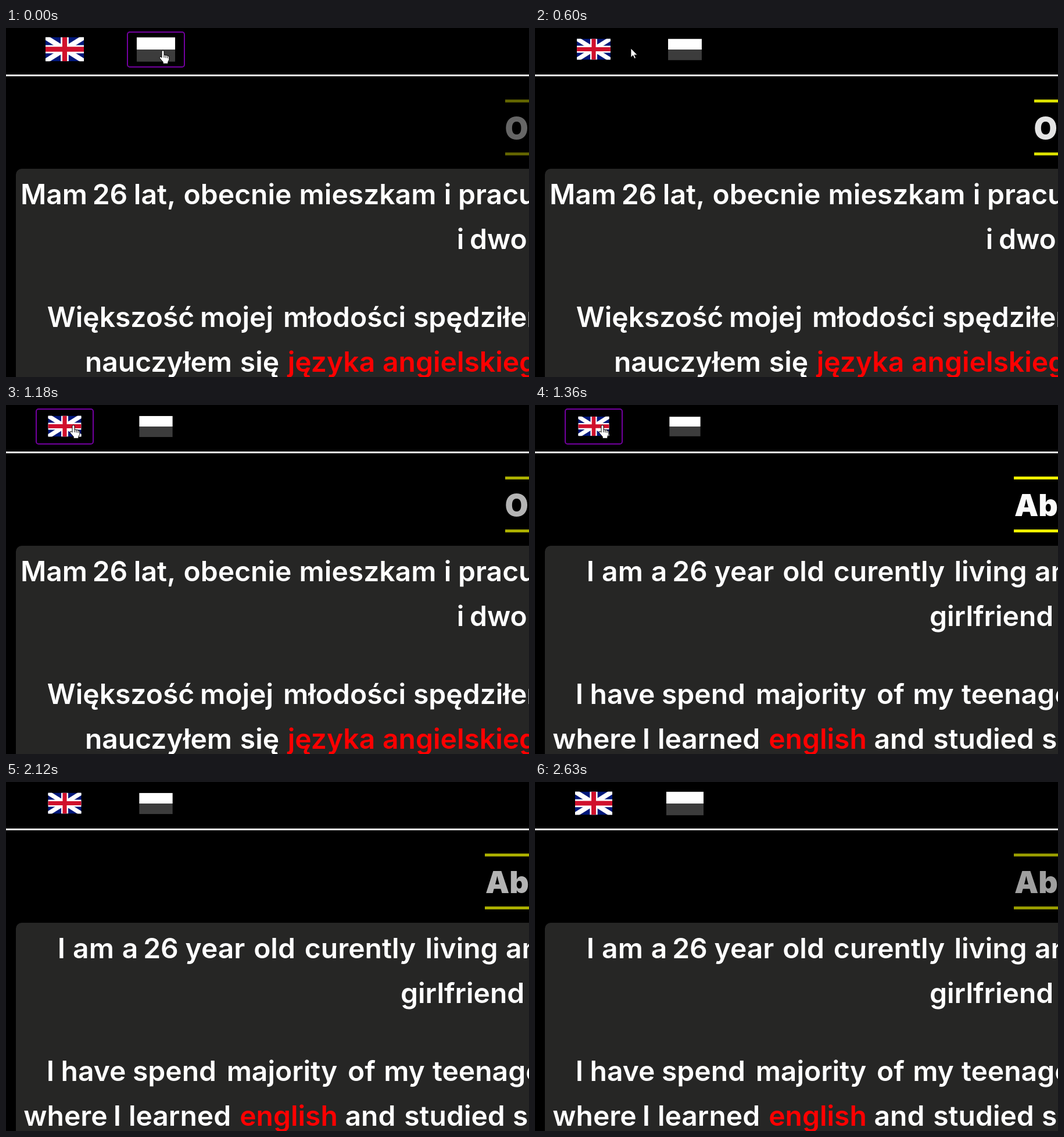
These frames come from a looping animation (900x600 px, 2.65 s). An HTML page:

```html
<!DOCTYPE html>
<html lang="pl">
<head>
<meta charset="utf-8">
<title>Language switch</title>
<style>
  html, body { margin: 0; width: 100%; height: 100%; overflow: hidden; background: #000; }
  svg { display: block; }
  text { font: 600 48px Inter, "Open Sans", sans-serif; fill: #fff; white-space: pre; }
  .title text { font-size: 52px; font-weight: 900; }
  .key { fill: #f00; }
  .hover { fill: none; stroke: #7300a0; stroke-width: 2; }
</style>
</head>
<body>
<svg width="900" height="600" viewBox="0 0 900 600">
  <rect width="900" height="600"/>
  <rect y="80" width="900" height="3" fill="#fff"/>
  <rect x="17" y="242" width="920" height="400" rx="10" fill="#262625"/>

  <rect class="hover" id="boxEn" x="52" y="7" width="98" height="60" rx="4"/>
  <rect class="hover" id="boxPl" x="209" y="7" width="98" height="60" rx="4"/>

  <g id="flagEn">
    <svg x="-33.3" y="-20.8" width="66.6" height="41.6" viewBox="0 0 66 41" preserveAspectRatio="none">
      <rect width="66" height="41" fill="#00187a"/>
      <path d="M0 0L66 41M66 0L0 41" stroke="#fff" stroke-width="8.5"/>
      <path d="M33 0V41M0 20.5H66" stroke="#fff" stroke-width="13.7"/>
      <path d="M33 0V41M0 20.5H66" stroke="#d0102c" stroke-width="8.2"/>
    </svg>
  </g>
  <g id="flagPl">
    <rect x="-33.3" y="-21" width="66.6" height="21" fill="#fff"/>
    <rect x="-33.3" width="66.6" height="21" fill="#3c3c3c"/>
  </g>

  <g id="pl"></g>
  <g id="en"></g>

  <g id="hand" stroke="#000" stroke-linejoin="round">
    <path fill="#fff" d="M-2 1.6Q-2 -.4 0 -.4T2 1.6V7L8 8.2Q10.8 9 10.8 11.6V15.5L8.8 19.5V22.3H.2V19.5L-5.6 12.8Q-6.4 10-3.8 10.4L-2 12Z"/>
    <path fill="none" d="M2 7V12M5 8V12.5M8 8.6V13"/>
  </g>
  <path id="arrow" fill="#fff" stroke="#000" stroke-width=".8" d="M0 0V15.5L3.6 12.1L6.2 17.5L8.5 16.5L6 11.2H11Z"/>
</svg>

<script>
const $ = id => document.getElementById(id);

// Each line: baseline, then centre and word. The last word is set from its
// left edge, as it runs off the stage. "*" marks a red word.
const pages = {
  pl: {
    left: 859, titleX: 858.5, title: "O mnie",
    lines: [
      [303, 82.5, "Mam", 179, "26", 256, "lat,", 398.5, "obecnie", 622.5, "mieszkam", 760, "i", 778, "pracuję"],
      [380, 782, "i", 798, "dwoma"],
      [514, 197.5, "Większość", 397, "mojej", 582.5, "młodości", 701, "spędziłem"],
      [591, 262.5, "nauczyłem", 436.5, "się", 560, "*języka", 648, "*angielskiego"]
    ]
  },
  en: {
    left: 824, titleX: 825, title: "About",
    lines: [
      [303, 95.5, "I", 150.5, "am", 213.5, "a", 266.5, "26", 360, "year", 462, "old", 609.5, "curently", 784, "living", 860, "and"],
      [380, 679, "girlfriend"],
      [514, 76.5, "I", 150.5, "have", 290, "spend", 475, "majority", 612, "of", 685.5, "my", 734, "teenage"],
      [591, 102.5, "where", 191.5, "I", 299, "learned", 486.5, "*english", 627, "and", 772, "studied", 872, "school"]
    ]
  }
};

function render({ left, titleX, title, lines }) {
  const bar = y => `<rect x="${left}" y="${y}" width="200" height="5" fill="#f4fa00"/>`;
  let out = `<g class="title">${bar(123)}${bar(214)}<text x="${titleX}" y="191">${title}</text></g>`;
  for (const [y, ...words] of lines) {
    for (let i = 0; i < words.length; i += 2) {
      const word = words[i + 1];
      const cls = word[0] === "*" ? ' class="key"' : "";
      const anchor = i + 2 < words.length ? "middle" : "start";
      out += `<text x="${words[i]}" y="${y}" text-anchor="${anchor}"${cls}>${word.replace("*", "")}</text>`;
    }
  }
  return out;
}
for (const id in pages) $(id).innerHTML = render(pages[id]);
const titles = document.querySelectorAll(".title");

const LOOP = 2650, PULSE = 942, SWITCH = 1240;

// Moments at which the screen refreshes.
const ticks = [];
for (const [from, to] of [[0, 900], [940, 1360], [1480, 1600], [1670, 1970], [2020, 2020], [2060, 2120], [2160, 2220], [2260, 2560], [2630, 2630]])
  for (let t = from; t <= to; t += 60) ticks.push(t);

// Pointer path: time, x, y.
const path = [
  [0, 270, 39], [240, 268, 39], [480, 200, 37], [600, 165, 35], [780, 118, 35],
  [840, 116, 35], [1480, 116, 35], [1540, 117, 78], [1600, 122, 290], [1670, 132, 575]
];

function pointer(t) {
  const i = path.findIndex(p => p[0] >= t);
  if (i < 0) return null;
  if (i === 0) return path[0].slice(1);
  const [t0, x0, y0] = path[i - 1], [t1, x1, y1] = path[i];
  const k = (t - t0) / (t1 - t0);
  return [x0 + (x1 - x0) * k, y0 + (y1 - y0) * k];
}

const wave = t => Math.sin(Math.PI * t / PULSE) ** 2;
const show = (id, on) => $(id).setAttribute("display", on ? "inline" : "none");
const place = (id, value) => $(id).setAttribute("transform", value);

function draw(now) {
  const time = now % LOOP;
  const t = ticks.filter(v => v <= time).pop();

  const scale = 1 - 0.2 * wave(t + 60);
  place("flagEn", `translate(101 36.5) scale(${scale})`);
  place("flagPl", `translate(258 37) scale(${scale})`);
  titles.forEach(el => el.setAttribute("opacity", 0.4 + 0.6 * wave(t)));

  show("pl", t < SWITCH);
  show("en", t >= SWITCH);

  const pos = pointer(t);
  const over = x => !!pos && pos[0] >= x && pos[0] <= x + 100 && pos[1] >= 6 && pos[1] <= 68;
  const onEn = over(51), onPl = over(208);
  show("boxEn", onEn);
  show("boxPl", onPl);
  show("hand", onEn || onPl);
  show("arrow", pos && !onEn && !onPl);
  if (pos) {
    place("hand", `translate(${pos})`);
    place("arrow", `translate(${pos})`);
  }
}

const start = performance.now();
function frame() {
  draw(performance.now() - start);
  requestAnimationFrame(frame);
}
frame();
</script>
</body>
</html>
```
